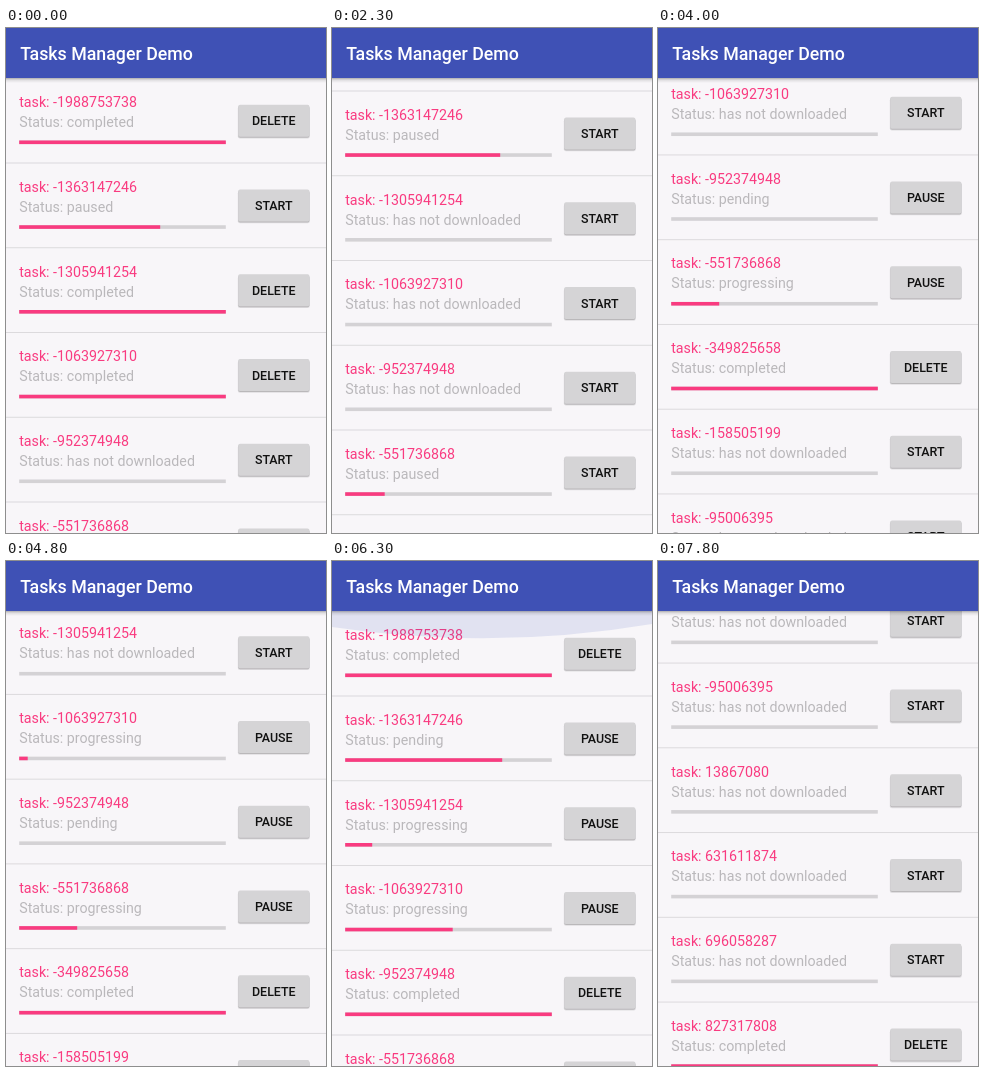
An HTML page that plays this animation: 320x505 px, repeating every 8 s.

```html
<!DOCTYPE html>
<html lang="en">
<head>
<meta charset="utf-8">
<title>Tasks Manager Demo</title>
<style>
  html, body { margin: 0; width: 100%; height: 100%; overflow: hidden; background: #f8f6f9; }
  svg { display: block; width: 320px; height: 505px; font-family: Roboto, "Noto Sans", sans-serif; }
  .bar-title { font-size: 17.78px; font-weight: 500; fill: #fff; }
  .name, .status { font-size: 14.22px; }
  .name { fill: #f93b80; }
  .status { fill: #bab8bb; }
  .label { font-size: 12.44px; font-weight: 500; fill: #111; text-anchor: middle; }
  .button { fill: #d5d4d6; }
  .track { fill: #d4d2d5; }
  .fill { fill: #f93b80; }
  .line { fill: #dcdadd; }
</style>
</head>
<body>
<svg viewBox="0 0 320 505">
  <defs>
    <linearGradient id="shade" x2="0" y2="1">
      <stop offset="0" stop-color="#000" stop-opacity=".3"/>
      <stop offset=".4" stop-color="#000" stop-opacity=".1"/>
      <stop offset="1" stop-color="#000" stop-opacity="0"/>
    </linearGradient>
  </defs>
  <rect width="320" height="505" fill="#f8f6f9"/>
  <g id="list"></g>
  <path id="glow" d="M0 50H320V63Q160 90 0 66Z" fill="#3f51b5"/>
  <rect y="50" width="320" height="5" fill="url(#shade)"/>
  <rect width="320" height="50" fill="#3f51b5"/>
  <text class="bar-title" x="14.2" y="32.2">Tasks Manager Demo</text>
</svg>
<script>
const LOOP = 8000, STEP = 100, PITCH = 84.75, FULL = 206.6;
const NONE = 'has not downloaded', WAIT = 'pending', RUN = 'progressing',
      HALT = 'paused', DONE = 'completed';
const LABELS = { [NONE]: 'START', [HALT]: 'START', [WAIT]: 'PAUSE', [RUN]: 'PAUSE', [DONE]: 'DELETE' };

// Each task: id, [time, state] changes, [time, px] progress keys
const tasks = [
  [-1988753738, [[0, DONE]]],
  [-1363147246, [[0, HALT], [900, WAIT], [1000, RUN], [1500, HALT], [5900, WAIT], [6600, RUN]],
    [[0, 141], [1000, 141], [1500, 155], [5900, 155], [6000, 157], [6600, 157], [8000, 206]]],
  [-1305941254, [[0, DONE], [1300, NONE], [5000, WAIT], [5900, RUN]], [[5900, 0], [6300, 27], [8000, 140]]],
  [-1063927310, [[0, DONE], [1700, NONE], [4200, WAIT], [4700, RUN], [7800, DONE]],
    [[4670, 0], [4800, 8.5], [6300, 107.5], [7800, FULL]]],
  [-952374948, [[0, NONE], [3300, WAIT], [4900, RUN], [5900, DONE]], [[4900, 0], [5900, FULL]]],
  [-551736868, [[0, HALT], [3200, WAIT], [3300, RUN]], [[3300, 39.5], [4000, 48], [4800, 58], [8000, 98]]],
  [-349825658, [[0, DONE]]],
  [-158505199],
  [-95006395],
  [13867080],
  [631611874],
  [696058287],
  [827317808, [[0, DONE]]],
  [891204415]
];

const scrollKeys = [
  [1800, 0], [2200, 72], [2300, 72], [2700, 314.4], [3300, 314.4], [3800, 262.3],
  [4200, 262.3], [4700, 171.1], [5100, 171.1], [5700, 0], [6700, 0], [7800, 626.2]
];
const glowKeys = [[5900, 0], [6200, .12], [6300, .12], [6700, 0]];

const linear = u => u;
const easeOut = u => 1 - (1 - u) ** 2;
const smooth = u => u * u * (3 - 2 * u);

function valueAt(keys, t, ease = linear) {
  const i = keys.findIndex(k => k[0] > t);
  if (i === 0) return keys[0][1];
  if (i < 0) return keys[keys.length - 1][1];
  const [t0, a] = keys[i - 1], [t1, b] = keys[i];
  return a + (b - a) * ease((t - t0) / (t1 - t0));
}

function add(parent, tag, attrs, text = '') {
  const el = document.createElementNS('http://www.w3.org/2000/svg', tag);
  for (const k in attrs) el.setAttribute(k, attrs[k]);
  el.textContent = text;
  return parent.appendChild(el);
}

const list = document.getElementById('list');
const glow = document.getElementById('glow');

function makeRow([id, states = [[0, NONE]], progress = [[0, 0]]], i) {
  const g = add(list, 'g', { transform: `translate(0 ${i * PITCH})` });
  const box = (cls, x, y, width, height, more) =>
    add(g, 'rect', { class: cls, x, y, width, height, ...more });
  add(g, 'text', { class: 'name', x: 13.2, y: 79 }, 'task: ' + id);
  const status = add(g, 'text', { class: 'status', x: 13.2, y: 99 });
  box('track', 13.2, 112.5, FULL, 3.6);
  const fill = box('fill', 13.2, 112.5, 0, 3.6);
  box('line', 0, 134.5, 320, 1);
  box('', 231.8, 78.4, 72, 32.2, { rx: 2, opacity: .1 });
  box('', 232.2, 77.6, 71.2, 32.2, { rx: 2, opacity: .17 });
  box('button', 232.2, 76.8, 71.2, 32, { rx: 1.8 });
  const label = add(g, 'text', { class: 'label', x: 267.8, y: 97.4 });

  return t => {
    const state = states.filter(s => s[0] <= t).pop()[1];
    const width = state === DONE ? FULL : state === NONE ? 0 : valueAt(progress, t);
    status.textContent = 'Status: ' + state;
    label.textContent = LABELS[state];
    fill.setAttribute('width', width);
  };
}

const rows = tasks.map(makeRow);

function draw(time) {
  const t = Math.floor(time % LOOP / STEP) * STEP;
  const scroll = valueAt(scrollKeys, t, t >= 2300 && t < 2700 ? easeOut : smooth);
  list.setAttribute('transform', `translate(0 ${-scroll})`);
  glow.setAttribute('opacity', valueAt(glowKeys, t));
  rows.forEach(update => update(t));
}

const start = performance.now();
function tick() {
  draw(performance.now() - start);
  requestAnimationFrame(tick);
}
tick();
</script>
</body>
</html>
```
